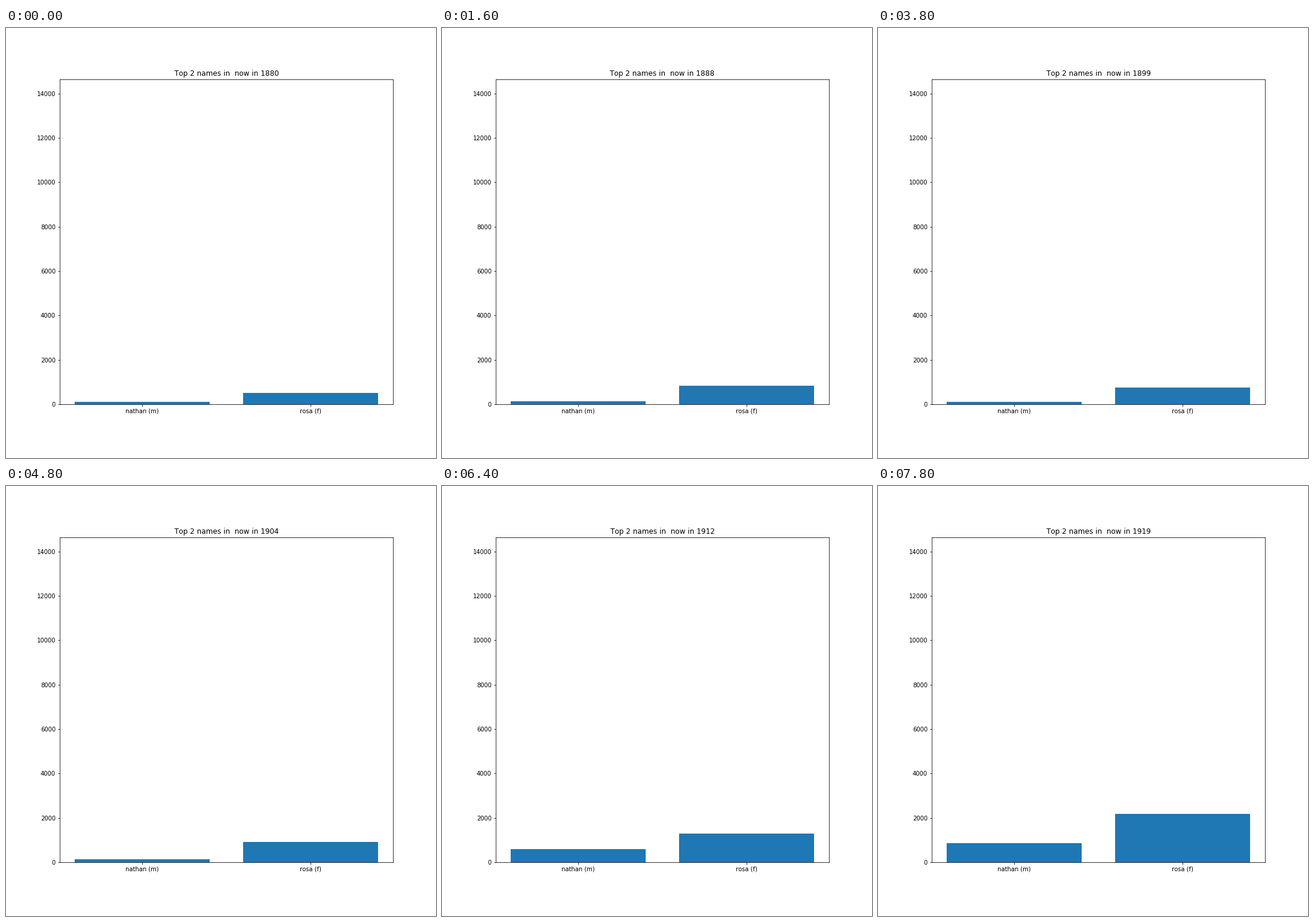
Recreate the animation shown at these times as a matplotlib script. Size 720x720 px, loop 8000 ms.

```python
import numpy as np
import matplotlib.pyplot as plt
from matplotlib.animation import FuncAnimation

plt.rcParams["font.family"] = "DejaVu Sans"
plt.rcParams["text.kerning_factor"] = 6  # classic letter spacing

FIRST_YEAR = 1880
YEARS = 40
STEP_MS = 200
Y_MAX = 14628

# Births at a few key years; the years between are interpolated.
KEY_YEARS = [1880, 1888, 1899, 1904, 1910, 1912, 1916, 1919]
BIRTHS = {
    "nathan (m)": [114, 135, 109, 135, 265, 592, 885, 861],
    "rosa (f)": [510, 835, 754, 915, 1110, 1290, 2110, 2180],
}

fig, ax = plt.subplots(figsize=(10, 10), dpi=72, facecolor="white")
fig.subplots_adjust(left=0.125, right=0.9, bottom=0.125, top=0.88)

bars = ax.bar(list(BIRTHS), [0] * len(BIRTHS), width=0.8, color="#1f77b4")
ax.set_xlim(-0.49, 1.49)
ax.set_ylim(0, Y_MAX)
ax.set_yticks(range(0, 14001, 2000))
title = ax.set_title("", fontsize=12)


def draw(i):
    year = FIRST_YEAR + i
    for bar, counts in zip(bars, BIRTHS.values()):
        bar.set_height(np.interp(year, KEY_YEARS, counts))
    title.set_text(f"Top 2 names in  now in {year}")
    return [*bars, title]


anim = FuncAnimation(fig, draw, frames=YEARS, interval=STEP_MS,
                     repeat=True, repeat_delay=0, blit=False)
plt.show()
```
